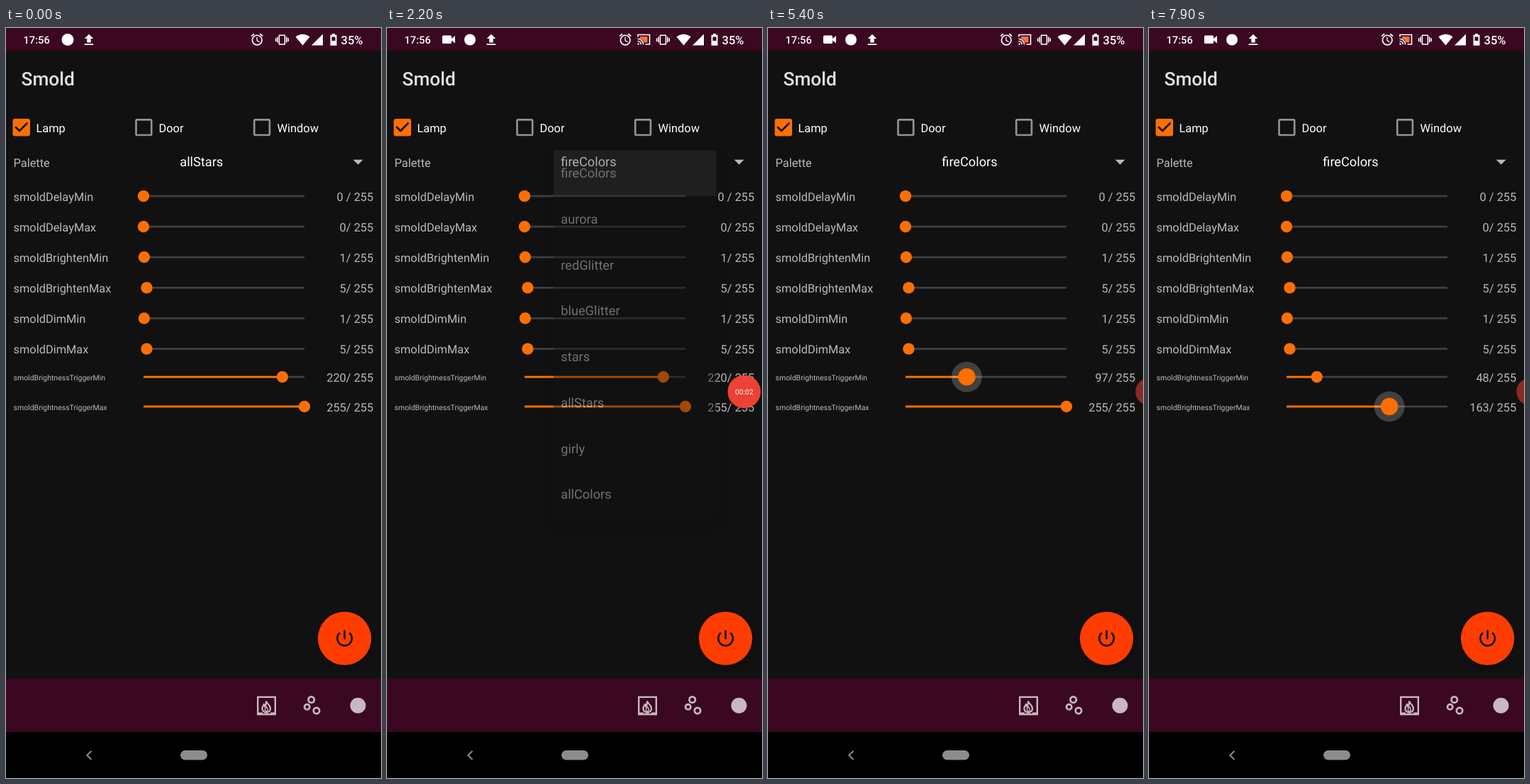
Recreate the animation shown at these times as an HTML page. Size 529 by 1058 pixels, loop 8 s.

```html
<!DOCTYPE html>
<html lang="en">
<head>
<meta charset="utf-8">
<title>Smold settings</title>
<style>
  html, body { margin: 0; height: 100%; overflow: hidden; background: #111; }
  svg { display: block; width: 100vw; height: 100vh; }
  text { font: 16.4px Roboto, sans-serif; fill: #b9b9b9; text-rendering: geometricPrecision; }
  .white { fill: #fff; }
  .item { font-size: 18.2px; fill: #fff; }
  .small { font-size: 10.5px; }
  .value { text-anchor: end; white-space: pre; }
  .line { fill: none; stroke-width: 2.7; }
</style>
</head>
<body>
<svg viewBox="0 0 529 1058">
  <rect width="529" height="1058" fill="#111"/>
  <rect width="529" height="32" fill="#3a0820"/>
  <rect y="918" width="529" height="75" fill="#3a0820"/>
  <rect y="993" width="529" height="65"/>

  <!-- status bar -->
  <g fill="#fff">
    <text class="white" x="24.5" y="22.3" style="font-size:14.7px;font-weight:500">17:56</text>
    <circle id="notice" cx="87" cy="16.5" r="8.5"/>
    <g id="recording">
      <rect x="78" y="10.5" width="13" height="11.5" rx="1.5"/>
      <path d="M91 15l5-4v10.5l-5-4z"/>
      <circle cx="117" cy="16.5" r="8"/>
    </g>
    <path id="upload" d="M9 16h6v-6h4l-7-7-7 7h4zm-4 2h14v2H5z"/>
    <path id="alarm" d="M22 5.72l-4.6-3.86-1.29 1.53 4.6 3.86zM7.88 3.39L6.6 1.86 2 5.71l1.29 1.53zM12.5 8H11v6l4.75 2.85.75-1.23-4-2.37zM12 4a9 9 0 1 0 0 18a9 9 0 0 0 0-18zm0 16a7 7 0 1 1 0-14a7 7 0 0 1 0 14z"/>
    <g id="cast">
      <path d="M357 12h10.5v8.5h-5a8 8 0 0 0-5.5-5.5z" fill="#ff6f3c"/>
      <path d="M354 12.5V9.5h16.5v13.5h-6M353.5 15.3a8 8 0 0 1 8 8M353.5 18.5a4.7 4.7 0 0 1 4.7 4.7" fill="none" stroke="#fff" stroke-width="1.6"/>
      <path d="M353.5 21v2.4h2.4a2.4 2.4 0 0 0-2.4-2.4z"/>
    </g>
    <path transform="translate(379.8 7) scale(.8)" fill-rule="evenodd" d="M0 15h2V9H0zm3 2h2V7H3zm19-8v6h2V9zm-3 8h2V7h-2zM7.5 3h9a1.5 1.5 0 0 1 1.5 1.5v15a1.5 1.5 0 0 1-1.5 1.5h-9a1.5 1.5 0 0 1-1.5-1.5v-15a1.5 1.5 0 0 1 1.5-1.5zM8 5v14h8V5z"/>
    <path d="M408.5 12.5q10-7.5 20 0L418.5 24.5zM431 24.5h16v-16z"/>
    <path fill-rule="evenodd" d="M460 8h4v1.7h2.5v15h-9v-15h2.5zM459.5 12.5v5.5h5v-5.5z"/>
    <text class="white" x="472.5" y="22.5" style="font-size:16.6px;font-weight:500">35%</text>
  </g>

  <text x="21.5" y="81" style="font-size:26.3px;font-weight:500;fill:#e2e2e2">Smold</text>

  <!-- checkboxes and palette row -->
  <rect x="9.5" y="128" width="24.5" height="24.5" rx="3" fill="#ff6f00"/>
  <path transform="translate(5.4 123.9) scale(1.36)" fill="#111" d="M10 17l-5-5 1.41-1.41L10 14.17l7.59-7.58L19 8z"/>
  <g class="line" stroke="#929292">
    <rect x="183.5" y="129.3" width="21.7" height="21.7" rx="1.5"/>
    <rect x="350.2" y="129.3" width="21.7" height="21.7" rx="1.5"/>
  </g>
  <text class="white" x="42.5" y="146.8">Lamp</text>
  <text class="white" x="215.5" y="146.8">Door</text>
  <text class="white" x="382.5" y="146.8">Window</text>
  <text x="10.5" y="195.5">Palette</text>
  <text id="palette" class="item" x="245.3" y="195.3"></text>
  <path d="M489.7 185.8h14l-7 7z" fill="#b9b9b9"/>

  <g id="sliders"></g>

  <!-- power button -->
  <circle cx="477.6" cy="861.1" r="37.7" fill="#ff3d00" style="filter:drop-shadow(0 3px 3px rgba(0,0,0,.3))"/>
  <path transform="translate(462.2 845.6) scale(1.286)" fill="#17100e" d="M13 3h-2v10h2zm4.83 2.17l-1.42 1.42A6.92 6.92 0 0 1 19 12a7 7 0 0 1-14 0c0-2.19 1.02-4.14 2.58-5.42L6.17 5.17A8.93 8.93 0 0 0 3 12a9 9 0 0 0 18 0c0-2.74-1.23-5.18-3.17-6.83z"/>

  <!-- bottom bar -->
  <g class="line" stroke="#c9b7c1">
    <rect x="355.2" y="943.8" width="24.6" height="24.4" stroke-width="2.4"/>
    <path d="M367 949.5c1 4 6 5.5 6 10.5a5.8 5.8 0 0 1-11.6 0c0-3 1.6-4 2.6-6 1 1 1 2 1.200 3 1.8-2 2-4.5 1.8-7.5zM356 966.500h6m11 0h6" stroke-width="2.200"/>
    <path d="M367.3 957.5q-4 4.5 0 7q4-2.5 0-7z" stroke-width="1.5"/>
    <circle cx="430.7" cy="947.5" r="4.2"/>
    <circle cx="424.7" cy="957.8" r="3.7"/>
    <circle cx="438" cy="963" r="4.2"/>
  </g>
  <circle cx="496.5" cy="955.8" r="11" fill="#c9b7c1"/>

  <!-- navigation -->
  <path d="M120.5 1020l-6.2 6 6.2 6" fill="none" stroke="#8c8c8c" stroke-width="2"/>
  <rect x="246" y="1019" width="38" height="13.5" rx="6.75" fill="#8c8c8c"/>

  <g id="popup">
    <rect x="235" y="172" width="230" height="518" rx="2" fill="#111" style="filter:drop-shadow(0 9px 10px rgba(0,0,0,.18))"/>
    <rect id="pressed" x="235" y="172.5" width="229.5" height="64.5" fill="#363636"/>
  </g>

  <g id="bubble">
    <circle r="24" fill="#f44336"/>
    <text id="clock" class="white" y="3.8" text-anchor="middle" style="font-size:10.6px"></text>
  </g>
</svg>
<script>
const $ = id => document.getElementById(id);
const LOOP = 8000, STEP = 100, TRACK_X = 194, TRACK_LENGTH = 227, ORANGE = '#ff6f00';

function add(parent, tag, attributes, text = '') {
  const node = document.createElementNS('http://www.w3.org/2000/svg', tag);
  for (const name in attributes) node.setAttribute(name, attributes[name]);
  node.textContent = text;
  return parent.appendChild(node);
}

// Linear interpolation through [time, value] points, held at both ends
function ramp(t, ...points) {
  if (t <= points[0][0]) return points[0][1];
  for (let i = 1; i < points.length; i++) {
    const [t0, v0] = points[i - 1], [t1, v1] = points[i];
    if (t <= t1) return v0 + (v1 - v0) * (t - t0) / (t1 - t0);
  }
  return points.at(-1)[1];
}

function makeSlider(name, y, initial, small, separator = '/ ') {
  const group = $('sliders');
  add(group, 'text', { x: 10.5, y: y + (small ? 4.5 : 6.8), class: small ? 'small' : '' }, 'smold' + name);
  const valueText = add(group, 'text', { x: 518.3, y: y + 6.8, class: 'value' });
  add(group, 'rect', { x: TRACK_X, y: y - 1.4, width: TRACK_LENGTH, height: 2.8, fill: '#3f3f3f' });
  const active = add(group, 'rect', { x: TRACK_X, y: y - 1.4, height: 2.8, fill: ORANGE });
  const halo = add(group, 'circle', { cy: y, fill: '#fff', 'fill-opacity': .2 });
  const thumb = add(group, 'circle', { cy: y, fill: ORANGE });
  const set = (value, press = 0) => {
    const length = TRACK_LENGTH * value / 255;
    active.setAttribute('width', length);
    for (const circle of [halo, thumb]) circle.setAttribute('cx', TRACK_X + length);
    halo.setAttribute('r', 21.5 * press);
    thumb.setAttribute('r', 8.2 + 4 * press);
    valueText.textContent = Math.round(value) + separator + 255;
  };
  set(initial);
  return set;
}

[['DelayMin', 0], ['DelayMax', 0], ['BrightenMin', 1], ['BrightenMax', 5], ['DimMin', 1], ['DimMax', 5]]
  .forEach(([name, value], i) => makeSlider(name, 237.1 + 43.1 * i, value, false, i ? '/ ' : ' / '));
const setTriggerMin = makeSlider('BrightnessTriggerMin', 492.2, 220, true);
const setTriggerMax = makeSlider('BrightnessTriggerMax', 534, 255, true);

['fireColors', 'aurora', 'redGlitter', 'blueGlitter', 'stars', 'allStars', 'girly', 'allColors']
  .forEach((name, i) => add($('popup'), 'text', { x: 245.3, y: 211.3 + 64.7 * i, class: 'item' }, name));

function render(t) {
  const started = ramp(t, [0, 0], [400, 1]);
  $('notice').style.opacity = 1 - started;
  $('recording').style.opacity = $('cast').style.opacity = started;
  $('upload').setAttribute('transform', `translate(${106.2 + 30 * started} 6) scale(.9)`);
  $('alarm').setAttribute('transform', `translate(${344 - 18 * started} 6) scale(.85)`);

  $('palette').textContent = t < 2100 ? 'allStars' : 'fireColors';
  $('popup').style.opacity = ramp(t, [1000, 0], [1200, 1], [2100, 1], [2200, .4], [2300, 0]);
  $('pressed').style.opacity = t >= 2000 ? 1 : 0;

  setTriggerMin(
    t < 4000 ? 220 : ramp(t, [4600, 191], [5400, 97], [6000, 64], [6300, 48]),
    ramp(t, [4600, 0], [4800, 1], [6200, 1], [6400, 0]));
  setTriggerMax(
    ramp(t, [7500, 255], [7900, 163]),
    ramp(t, [7400, 0], [7600, 1]));

  const x = ramp(t, [100, 555], [500, 502], [2100, 502], [2800, 515], [4600, 515], [5000, 537.3]);
  const scale = ramp(t, [2100, 1], [2800, .79]);
  $('bubble').setAttribute('transform', `translate(${x} 513) scale(${scale})`);
  $('bubble').style.opacity = ramp(t, [2100, 1], [2800, .78], [4600, .78], [5000, .53]);
  $('clock').style.opacity = ramp(t, [4600, 1], [5000, 0]);
  $('clock').textContent = '00:0' + [1000, 2000, 3100, 3800].filter(tick => t >= tick).length;
}

function frame() {
  render(Math.floor(performance.now() % LOOP / STEP) * STEP);
  requestAnimationFrame(frame);
}
frame();
</script>
</body>
</html>
```
